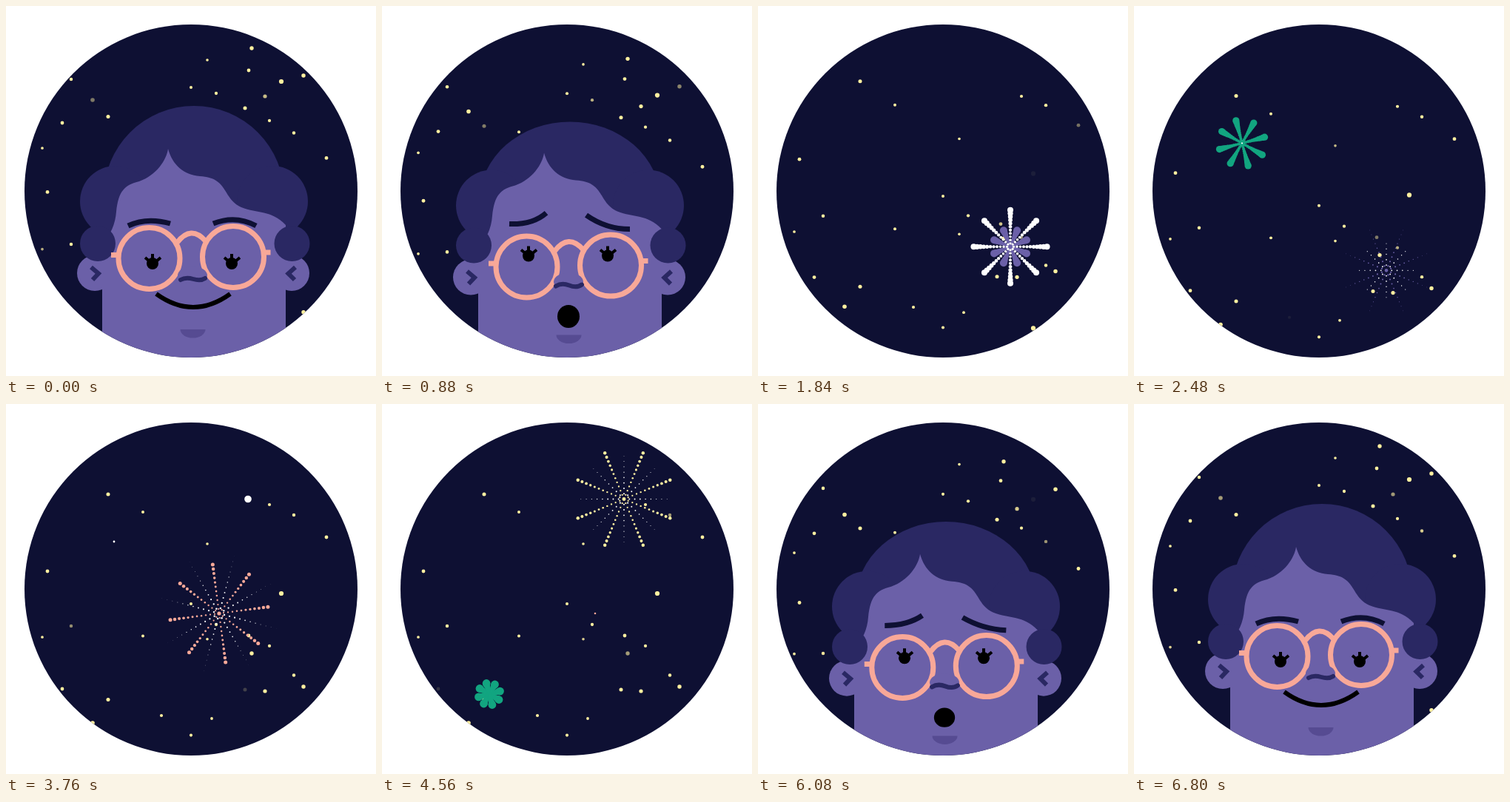
Recreate the animation shown at these times as an HTML page with a canvas. Size 500 by 500 pixels, loop 6880 ms.

```html
<!DOCTYPE html>
<html lang="en">
<head>
<meta charset="utf-8">
<title>Stargazer</title>
<style>
  html, body { margin: 0; width: 100%; height: 100%; overflow: hidden; background: #fff; }
  canvas { display: block; width: 500px; height: 500px; }
</style>
</head>
<body>
<canvas id="stage" width="500" height="500"></canvas>
<script>
const ctx = document.getElementById('stage').getContext('2d');
const LOOP = 6880, STEP = 80, TAU = Math.PI * 2;
const SKY = '#0e1033', HAIR = '#2a2863', SKIN = '#6b60a8', CHIN = '#564b92',
      PINK = '#f8a898', GREEN = '#12a580', STAR = '#fff0a0', WHITE = '#fff';

// x, y with the camera down, travel as it rises; nearer stars travel further
const stars = [
  [356, -36, 172], [389, -45, 195], [433, -51, 231], [138, -128, 250], [185, -5, 151],
  [402, 94, 288], [332, 57, 280], [328, 87, 226], [350, 122, 266], [323, 138, 248],
  [284, 118, 180], [250, 110, 160], [272, 73, 116], [117, 127, 304], [76, 158, 227],
  [372, -107, 363], [372, 102, 363], [88, 99, 201], [56, -5, 231], [49, 192, 123],
  [210, 249, 172], [278, 292, 133]
];

// x, y with the camera up, then the colours in order of firing
const bursts = [
  [341, 358, WHITE, SKIN],
  [146, 186, GREEN],
  [288, 283, WHITE, PINK],
  [327, 128.5, WHITE, STAR],
  [145, 392, GREEN]
];

const clamp = v => Math.max(0, Math.min(1, v));
const mix = (a, b, k) => a + (b - a) * k;
const smooth = v => { v = clamp(v); return v * v * (3 - 2 * v); };

// cubic-bezier(a, 0, b, 1)
function ease(v, a, b) {
  v = clamp(v);
  let lo = 0, hi = 1;
  for (let i = 0; i < 24; i++) {
    const s = (lo + hi) / 2, r = 1 - s;
    if (3 * a * s * r * r + 3 * b * s * s * r + s * s * s < v) lo = s; else hi = s;
  }
  return smooth(lo);
}

const camera = t => ease((t - 760) / 1840, .2, .03) - ease((t - 5200) / 1360, .333, .13);

function oval(x, y, rx, ry, fill, sweep = TAU) {
  ctx.beginPath();
  ctx.ellipse(x, y, rx, ry, 0, 0, sweep);
  ctx.fillStyle = fill;
  ctx.fill();
}
const dot = (x, y, r, fill) => oval(x, y, r, r, fill);

function line(d, colour, width) {
  ctx.strokeStyle = colour;
  ctx.lineWidth = width;
  ctx.stroke(new Path2D(d));
}

// Each star repeats once below itself and dims once a loop
function drawStars(t, cam) {
  stars.forEach(([x, y, travel], i) => {
    const radius = 1.2 + travel / 190;
    for (const copy of [0, 1]) {
      const dimAt = (i + copy / 2) * .618 % 1 * LOOP;
      const gap = Math.abs(t - dimAt);
      ctx.globalAlpha = Math.max(.06, clamp(Math.min(gap, LOOP - gap) / 500));
      dot(x, y + travel * (cam + copy * 1.11), radius, STAR);
    }
  });
  ctx.globalAlpha = 1;
}

// Dots grow outwards while flying, then die from the outside in
function drawRays(age, colour, turn) {
  if (age <= 0) return;
  const count = 11;
  const reach = (colour === WHITE ? 80 : 72) * (1 - Math.pow(1 - clamp(age / 800), 3));
  const size = 6 * Math.exp(-age / 550);
  const dying = clamp((age - 450) / 250);
  const gone = clamp((age - 700) / 300);
  for (let arm = 0; arm < 8; arm++) {
    const a = (turn + arm * 45) * TAU / 360;
    for (let i = 1; i <= count * (1 - gone); i++) {
      const k = i / count;
      const r = size * mix(.4 + .6 * k * k, .8 - .7 * k, dying);
      dot(Math.cos(a) * reach * k, Math.sin(a) * reach * k, r, colour);
    }
  }
}

function drawBursts(t, cam) {
  bursts.forEach(([x, y, ...colours], i) => {
    const age = t - 1620 - 720 * i;
    if (age < -120 || age > 1900) return;
    ctx.save();
    ctx.translate(x, y - 402 * (1 - cam));
    const core = age < 200 ? WHITE : colours[1] || WHITE;
    const r = 4.8 * clamp((age + 120) / 100) * Math.exp(-Math.max(0, age) / 1150);
    dot(0, 0, r * clamp((1900 - age) / 300), core);
    const lag = 120 + 60 * i;
    for (const j of [1, 0]) {
      if (colours[j]) drawRays(age - lag * j, colours[j], 30 * i + 22.5 * j);
    }
    ctx.restore();
  });
}

function brow(from, to, w) {
  const [a, b, c, d, e, f] = from.map((v, i) => mix(v, to[i], w));
  line(`M${a} ${b}Q${c} ${d} ${e} ${f}`, SKY, 7);
}

function drawEye(x, y) {
  dot(x, y, 8, '#000');
  line(`M${x - 10} ${y - 8}l6 5M${x} ${y - 13}v8M${x + 11} ${y - 8}l-6 5`, '#000', 4);
}

function drawGlasses(w) {
  ctx.save();
  ctx.translate(2 * w, 6 * w);
  const lens = 'a41.500 41.500 0 1 1 83 0a41.500 41.500 0 1 1 -83 0';
  line(`M152 341${lens}M265.500 339${lens}`, PINK, 7);
  line('M231 320Q250 295 270 318M142 336.500h10M348 333h9.500', PINK, 7);
  ctx.restore();
}

function drawMouth(w) {
  const smile = w * 2, gasp = smile - 1;
  if (gasp < 0) {
    const half = mix(50, 16, smile), y = mix(389, 408, smile);
    line(`M${253 - half} ${y}Q253 ${mix(425, 414, smile)} ${253 + half} ${y}`, '#000', 6);
  } else {
    oval(252, 414, mix(11, 15, gasp), mix(4, 15.5, gasp), '#000');
  }
}

function drawHead(cam, w) {
  const drop = 480 * Math.pow(Math.max(0, cam), 1.5);
  if (drop > 365) return;
  ctx.save();
  ctx.translate(0, drop);

  // hair, ears and face
  oval(254, 257, 122, 122 - 16 * w, HAIR);
  dot(148, 264, 48, HAIR);
  dot(360, 264, 48, HAIR);
  dot(120, 361, 24, SKIN);
  dot(386, 361, 24, SKIN);
  ctx.fillStyle = SKIN;
  ctx.fill(new Path2D('M130 500V320Q147 304 149 278C152 250 160 242 180 237' +
    'C203 229 217 208 219 193C225 215 240 228 262 230C301 232 292 260 318 272' +
    'C340 281 358 275 378 296V500Z'));
  dot(124, 321 - 3 * w, 24, HAIR);
  dot(386.5, 321 - 3 * w, 24, HAIR);
  line('M115 353L125 361.500L117 370M391 353L381.500 361.500L390 370', HAIR, 6);

  brow([165, 297, 190, 285, 222, 294], [172, 289, 204, 290, 222, 274], w);
  brow([280, 294, 310, 282, 338, 297], [276, 277, 303, 296, 335, 296], w);
  drawGlasses(w);
  drawEye(198, 348 - 16 * w);
  drawEye(305, 348 - 16 * w);

  // nose
  ctx.save();
  ctx.translate(0, 3 * w);
  oval(252, 364, 20, 12, SKIN);
  ctx.lineCap = 'round';
  line(`M${236 - w} 370Q243 ${366 - w} 253 369T${269 + w} 368`, HAIR, 6);
  ctx.restore();

  drawMouth(w);
  oval(252.5, 437 + 2 * w, 17, 11.5, CHIN, Math.PI);
  ctx.restore();
}

function draw(t) {
  const cam = camera(t);
  const awe = smooth((t - 560) / 300) - smooth((t - 6000) / 400);
  ctx.clearRect(0, 0, 500, 500);
  ctx.save();
  ctx.beginPath();
  ctx.arc(250, 250, 225, 0, TAU);
  ctx.clip();
  ctx.fillStyle = SKY;
  ctx.fillRect(0, 0, 500, 500);
  drawStars(t, cam);
  drawBursts(t, cam);
  drawHead(cam, awe);
  ctx.restore();
}

const begin = performance.now();
function tick() {
  const t = (performance.now() - begin) % LOOP;
  draw(Math.floor(t / STEP) * STEP);
  requestAnimationFrame(tick);
}
tick();
</script>
</body>
</html>
```
